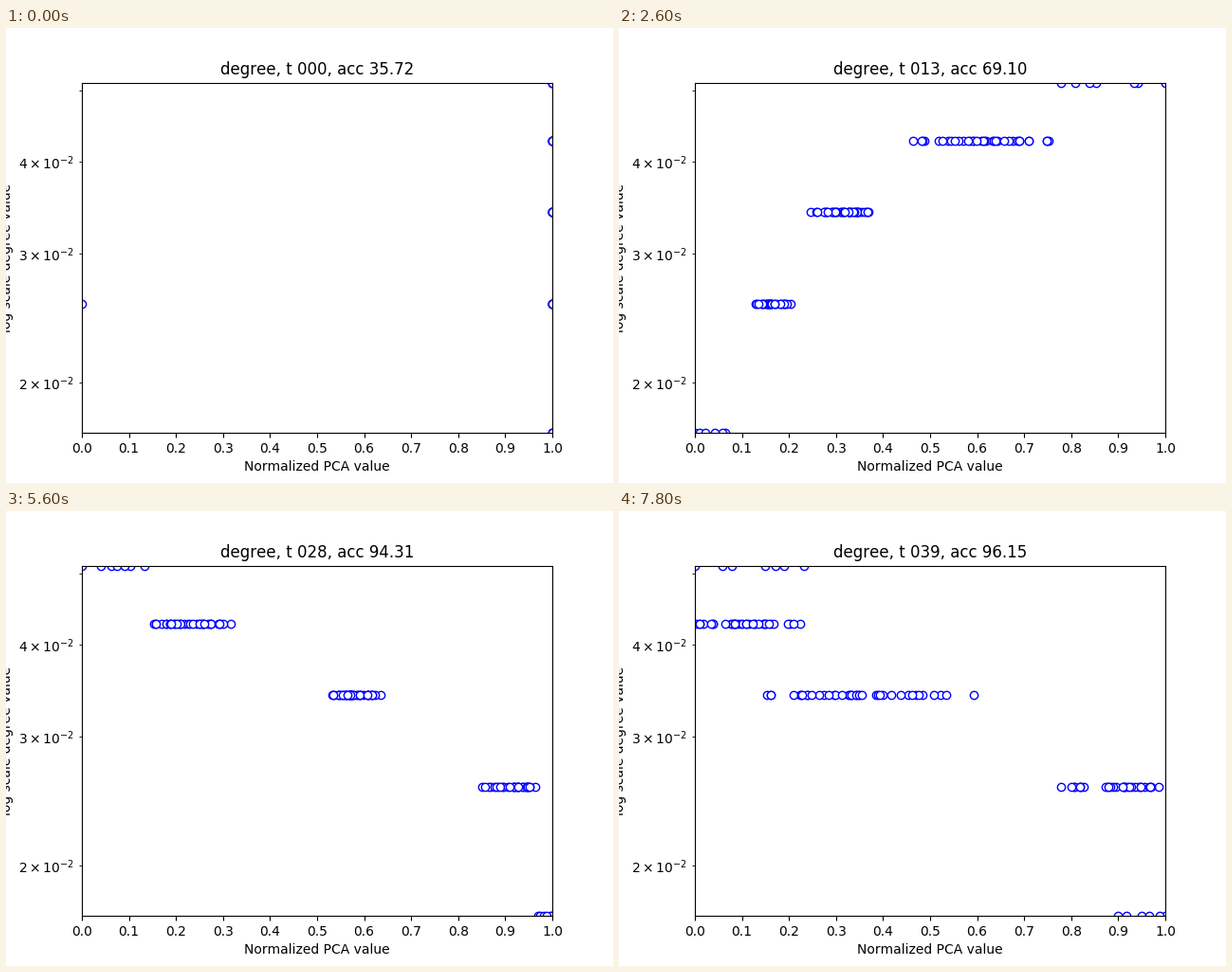
These frames come from a looping animation (640 px wide and 480 px high, 8000 ms). A matplotlib script:

```python
import numpy as np
import matplotlib.pyplot as plt
from matplotlib.animation import FuncAnimation

FRAMES, INTERVAL = 40, 200
DEGREES = np.arange(2, 7) / 117
COUNTS = [6, 30, 40, 35, 7]

# time: accuracy and the (low, high) span of each degree's values
KEYS = {
    8: (70.53, [(.89, .997), (.455, .587), (.2, .363), (.073, .194), (0, .108)]),
    13: (69.10, [(0, .065), (.13, .203), (.246, .369), (.464, .753), (.779, 1)]),
    17: (75.95, [(.03, .098), (0, .105), (.141, .265), (.575, .705), (.877, 1)]),
    24: (88.51, [(0, .034), (.037, .15), (.18, .27), (.543, .767), (.873, 1)]),
    31: (98.66, [(.972, .997), (.853, .966), (.385, .498), (.093, .21), (0, .139)]),
    39: (96.15, [(.9, 1), (.778, .985), (.153, .593), (.005, .224), (0, .232)]),
}
TIMES = list(KEYS)
START_ACC = 35.72


def is_falling(spans):
    return spans[0][0] > spans[-1][0]


def rising(spans):
    """Mirror falling spans so that all keys can be blended."""
    spans = np.array(spans)
    return 1 - spans[:, ::-1] if is_falling(spans) else spans


TRACKS = np.array([rising(spans) for _, spans in KEYS.values()])
ACC = [START_ACC] + [acc for acc, _ in KEYS.values()]

base_rng = np.random.default_rng(4)
PLACES = [base_rng.beta(1.6, 1.6, n) for n in COUNTS]
LEVELS = np.repeat(DEGREES, COUNTS)


def values(t):
    """Each row wobbles within its span; the direction flips between keys."""
    if t == 0:
        x = np.ones(len(LEVELS))
        x[COUNTS[0]] = 0
        return x
    rng = np.random.default_rng(t)
    rows = []
    for row, place in enumerate(PLACES):
        low, high = (np.interp(t, TIMES, TRACKS[:, row, side]) for side in (0, 1))
        u = np.clip(place + rng.normal(0, .06, len(place)), .02, .98)
        u[:2] = 0, 1
        rows.append(low + (high - low) * u)
    x = np.concatenate(rows)
    nearest = min(TIMES, key=lambda k: abs(k - t))
    return 1 - x if is_falling(KEYS[nearest][1]) else x


# older kerning keeps glyphs on whole pixels
plt.rcParams["text.kerning_factor"] = 6
fig, ax = plt.subplots(figsize=(6.4, 4.8), dpi=100)
dots, = ax.plot([], [], "o", markerfacecolor="white", markeredgecolor="blue")
ax.set_yscale("log")
ax.set_xlim(0, 1)
ax.set_ylim(DEGREES[0], DEGREES[-1])
ax.set_xticks(np.linspace(0, 1, 11))
ax.set_xlabel("Normalized PCA value")
ax.set_ylabel("log scale degree value")
title = ax.set_title("")


def draw(t):
    acc = np.interp(t, [0] + TIMES, ACC)
    dots.set_data(values(t), LEVELS)
    title.set_text(f"degree, t {t:03d}, acc {acc:.2f}")
    return dots, title


anim = FuncAnimation(fig, draw, frames=FRAMES, interval=INTERVAL,
                     repeat=True, repeat_delay=0, blit=False)
plt.show()
```
